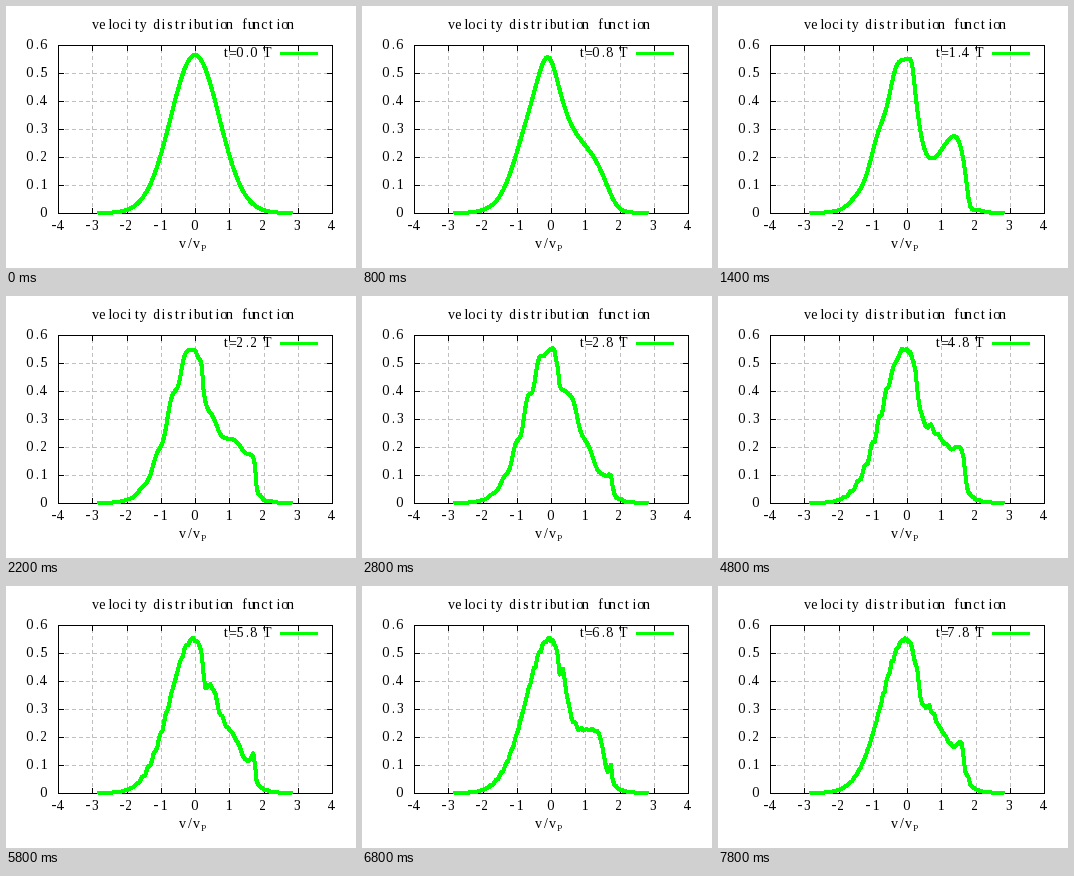
Write a matplotlib script that moves like this. It is 350 px wide and 262 px high and loops after 8000 ms.

```python
import numpy as np
import matplotlib as mpl
import matplotlib.pyplot as plt
from matplotlib.animation import FuncAnimation

mpl.rcParams.update({
    "font.family": "Liberation Serif",
    "text.hinting": "force_autohint",
    "text.hinting_factor": 1,
})

W, H, DPI = 350, 262, 100
FRAMES, STEP_MS = 40, 200
DT = 0.2            # wave periods per frame
TRAP = 0.8          # half width of the trapping island
DV = 0.05
GREEN = "#00ff00"
PT = 72 / DPI       # points per pixel

X0, X1, Y0, Y1 = 52, 326, 207, 39


def px(v):
    return X0 + (v + 4) * (X1 - X0) / 8


def py(f):
    return Y0 + f * (Y1 - Y0) / 0.6


def distributions(v, nx=600, sub=20):
    """Phase-averaged f(v) of particles in a travelling sine wave.

    Orbits are followed backwards to the initial Maxwellian."""
    i = np.arange(nx)
    x = np.tile((i + 0.5) / nx, (len(v), 1))
    u = v[:, None] - 1 + DV * (i * 0.618034 % 1 - 0.5)
    h = -DT / sub
    accel = np.pi * TRAP ** 2 / 2
    out = []
    for _ in range(FRAMES):
        out.append((np.exp(-(1 + u) ** 2) / np.sqrt(np.pi)).mean(axis=1))
        for _ in range(sub):
            x += u * h / 2
            u -= accel * np.sin(2 * np.pi * x) * h
            x += u * h / 2
    return out


fig = plt.figure(figsize=(W / DPI, H / DPI), dpi=DPI, facecolor="white")
ax = fig.add_axes([0, 0, 1, 1])
ax.set_xlim(0, W)
ax.set_ylim(H, 0)
ax.axis("off")


def line(xs, ys, color="black", width=1, **kw):
    return ax.plot(xs, ys, color=color, lw=width * PT, antialiased=False, **kw)[0]


def cells(x, base, text, pitch=7, size=14):
    """Text in fixed-width cells, one glyph centred in each."""
    return [ax.text(x + (k + 0.5) * pitch, base, c, fontsize=size * PT,
                    ha="center", va="baseline", zorder=5)
            for k, c in enumerate(text)]


grid = dict(color="#c0c0c0", dashes=(3, 3), zorder=1)
for n in range(-4, 5):
    x = px(n)
    if abs(n) < 4:
        line([x, x], [Y0, Y1], **grid)
        line([x, x], [Y0, Y0 - 5], zorder=2)
        line([x, x], [Y1, Y1 + 5], zorder=2)
    label = str(n)
    cells(x - 1 - 3.5 * len(label), 224, label)
for n in range(7):
    y = py(n / 10)
    if 0 < n < 6:
        line([X0, X1], [y, y], **grid)
        line([X0, X0 + 5], [y, y], zorder=2)
        line([X1, X1 - 5], [y, y], zorder=2)
    label = f"{n / 10:g}"
    cells(41 - 7 * len(label), y + 4, label)
line([X0, X1, X1, X0, X0], [Y0, Y0, Y1, Y1, Y0], zorder=2,
     solid_joinstyle="miter")

cells(86, 23, "velocity distribution function", pitch=6.73)
cells(173, 242, "v/v")
cells(194, 245, "P", size=9)

clock = cells(216, 51, "t=0.0 T")
line([274, 311], [47, 47], GREEN, 3, zorder=4, solid_capstyle="butt")

v = np.arange(-56, 57) * DV
curves = distributions(v)
curve = line(px(v), py(curves[0]), GREEN, 3, zorder=4,
             solid_joinstyle="round", solid_capstyle="round")


def draw(i):
    curve.set_ydata(py(curves[i]))
    for glyph, c in zip(clock, f"t={i * DT:.1f} T"):
        glyph.set_text(c)
    return [curve, *clock]


anim = FuncAnimation(fig, draw, frames=FRAMES, interval=STEP_MS,
                     repeat=True, repeat_delay=0, blit=False)
plt.show()
```
